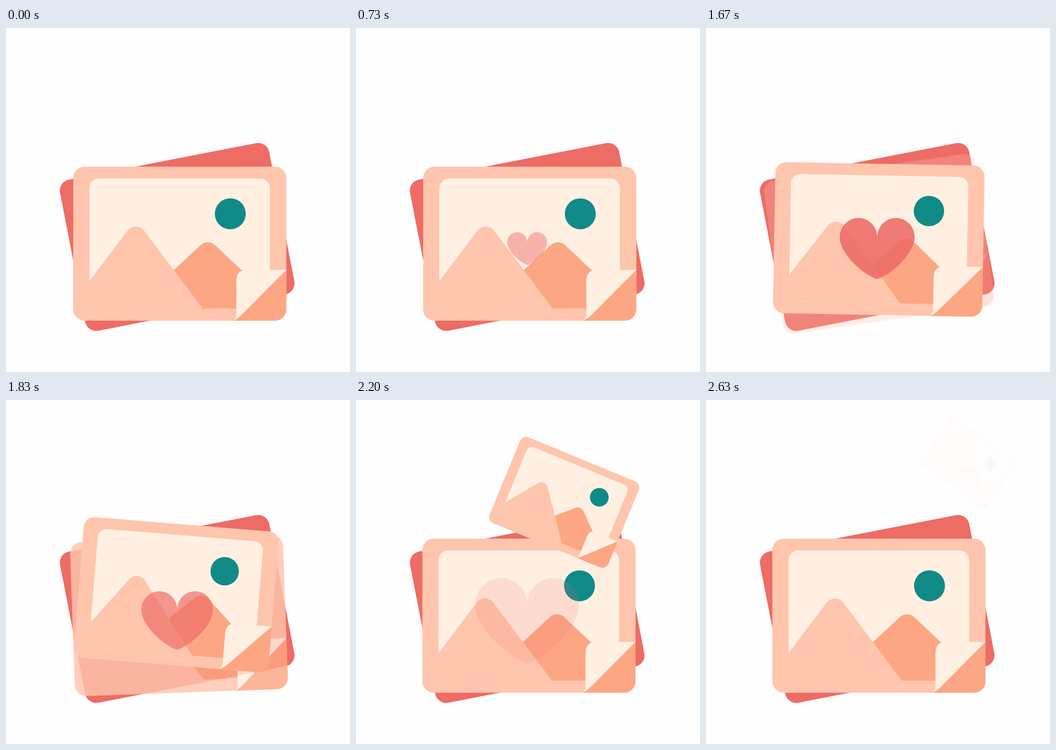
Animation of 640x640 px, one loop 2.73 s. Source, as an HTML page:

```html
<!DOCTYPE html>
<html lang="en">
<head>
<meta charset="utf-8">
<title>Photo stack</title>
<style>
  html, body { margin: 0; width: 100%; height: 100%; overflow: hidden; background: #fefefe; }
  svg { display: block; width: 100vw; height: 100vh; }
</style>
</head>
<body>
<svg viewBox="0 0 640 640">
  <defs>
    <clipPath id="inner"><rect x="155" y="280" width="336" height="242" rx="18"/></clipPath>
    <g id="card">
      <rect x="125" y="258" width="396.5" height="286.5" rx="21" fill="#ffc5ad"/>
      <rect x="155" y="280" width="336" height="242" rx="18" fill="#fff0e2"/>
      <g clip-path="url(#inner)">
        <path d="M234 522L312 450.5L362 404A20 20 0 0 1 389 404L440 452L470 480V522Z" fill="#fda684"/>
        <path d="M140 491L226 377A19.4 19.4 0 0 1 257 377L366 522H140Z" fill="#ffc5ad"/>
      </g>
      <circle cx="417.3" cy="345.7" r="28.8" fill="#108a87"/>
      <path d="M521.5 450H449Q428.5 450 428.5 470V531Q428.5 543 420 544.5H440L521.5 460Z" fill="#fff0e2"/>
      <path d="M521.5 450L438 534Q430 542 421 544.5H500.5A21 21 0 0 0 521.5 523.5Z" fill="#fda684"/>
    </g>
  </defs>
  <rect x="120.25" y="245.5" width="396.5" height="286.5" rx="21" fill="#ed6c66" transform="rotate(-11 318.5 388.75)"/>
  <use id="next" href="#card"/>
  <use id="top" href="#card"/>
  <path id="heart" fill="#ed6c66" d="M0-22A36.25 37 0 0 0-72.5-22C-72.5 8-34 45-5 58Q0 60 5 58C34 45 72.5 8 72.5-22A36.25 37 0 0 0 0-22Z"/>
</svg>
<script>
const LOOP = 2730, LAST = 2630;
const [next, front, heart] = ['next', 'top', 'heart'].map(id => document.getElementById(id));

const span = (t, from, to) => Math.min(1, Math.max(0, (t - from) / (to - from)));
const easeOut = u => Math.sin(u * Math.PI / 2);
const easeInOut = u => u < .5 ? 2 * u * u : 1 - 2 * (1 - u) ** 2;
const easeSine = u => (1 - Math.cos(u * Math.PI)) / 2;

// Flight path as Newton polynomials in the flight progress
const NODES = [0, .3255, .639, .994];
const PATH_X = [323.25, -2.92, 327.6, -210, -445];
const PATH_Y = [401.25, -319.5, -31.6, 225];
const along = (path, p) => path.reduceRight((sum, c, i) => c + (p - NODES[i]) * sum);

function place(el, x, y, angle, scale, opacity) {
  el.setAttribute('transform',
    `translate(${x} ${y}) rotate(${angle}) scale(${scale}) translate(-323.25 -401.25)`);
  el.setAttribute('opacity', opacity);
}

function heartWidth(t) {
  if (t < 1450) return 161 * easeOut(span(t, 415, 1450));
  if (t < 1780) return 161 - 28.6 * easeSine(span(t, 1450, 1780));
  return 132.4 + .000344 * (t - 1780) ** 2;
}

function draw(t) {
  t = Math.min(t, LAST);

  const reveal = easeInOut(span(t, 1490, 1980));
  place(next, 321.75, 401.25, -11 * (1 - reveal), 1, reveal);

  const p = easeInOut(span(t, 1530, 2695));
  place(front, along(PATH_X, p), along(PATH_Y, p), 35 * p, 1 - .62 * p,
    1 - easeInOut(span(t, 2230, 2690)));

  const shown = easeOut(span(t, 415, 1450)) * (1 - easeSine(span(t, 1440, 2460)));
  heart.setAttribute('transform', `translate(318.5 410) scale(${heartWidth(t) / 145})`);
  heart.setAttribute('opacity', shown);
}

const start = performance.now();
function tick() {
  draw((performance.now() - start) % LOOP);
  requestAnimationFrame(tick);
}
tick();
</script>
</body>
</html>
```
